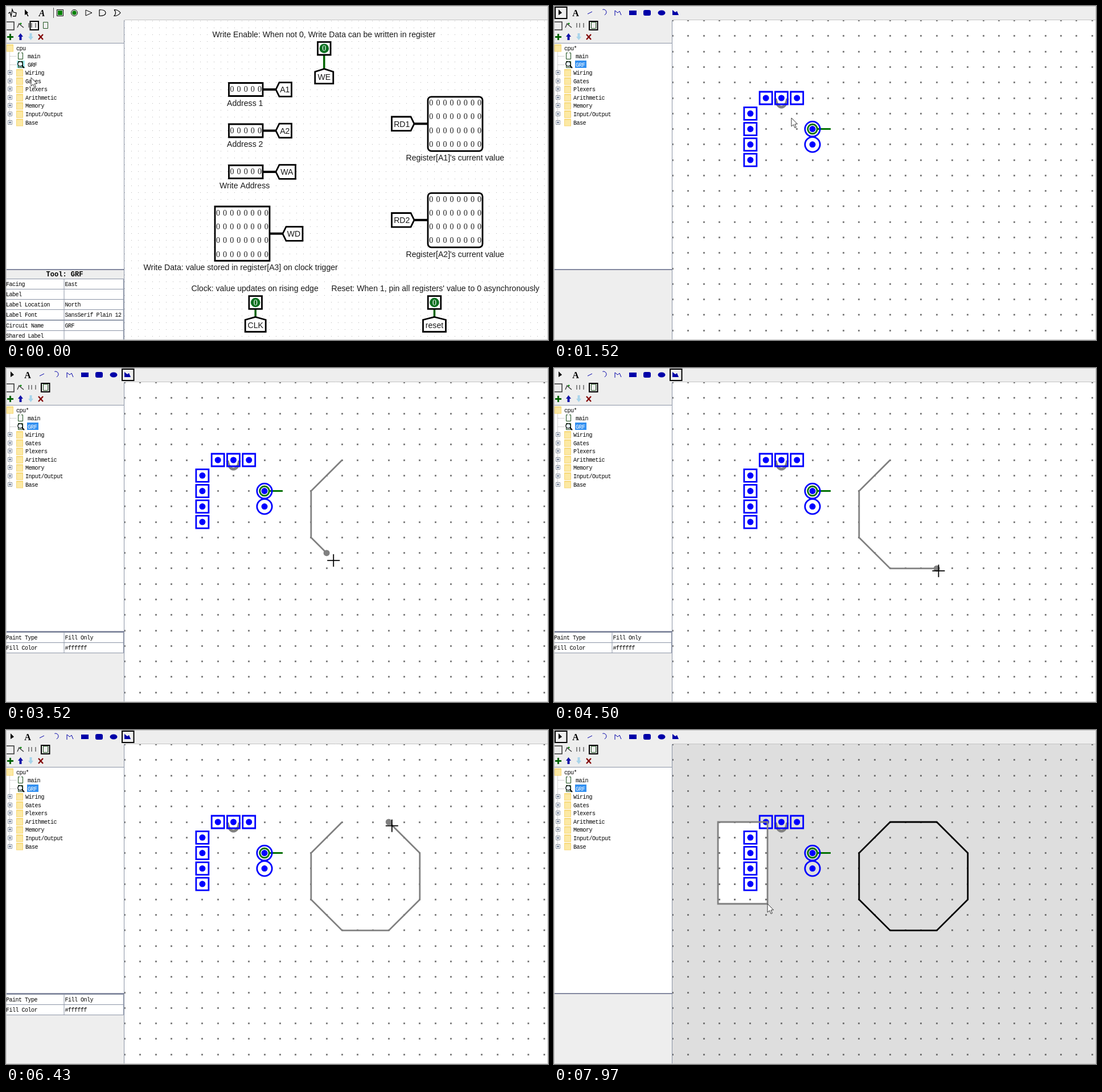
An HTML page with a canvas that plays this animation: 952 px wide and 588 px high, repeating every 8000 ms.

```html
<!DOCTYPE html>
<html lang="en">
<head>
<meta charset="utf-8">
<title>Circuit appearance editor</title>
<style>
html, body { margin: 0; width: 100%; height: 100%; overflow: hidden; background: #eee; }
canvas { display: block; }
</style>
</head>
<body>
<canvas width="952" height="588"></canvas>
<script>
const c = document.querySelector('canvas').getContext('2d');
const LOOP = 8000;
const SANS = '14.1px "Liberation Sans", sans-serif';
const BITS = '14.1px "Liberation Serif", serif';
const MONO = '10px "Liberation Mono", monospace';
const ICON = '16px "Liberation Serif", serif';
const BLUE = '#0000ff', NAVY = '#0000a8', GREEN = '#006400', GREY = '#808080', LINE = '#8b94a6';

// Moments at which the state changes
const T = { press: 100, menu: 300, scene: 810, select: 1300, remove: 1430, tool: 1980, start: 2330, close: 7600, drag: 7780 };

// Appearance editor grid
const STEP = 27.28;
const gx = col => 208.5 + STEP * col;
const gy = row => 25.6 + STEP * row;

// Octagon corners, walked from the top left one
const corners = [[14, 5]];
for (let i = 0; i < 8; i++) {
  const [x, y] = corners[i], a = (3 - i) * Math.PI / 4, n = 2 + i % 2;
  corners.push([x + n * Math.round(Math.cos(a)), y + n * Math.round(Math.sin(a))]);
}
// Start and end of the pointer's way to each corner
const legs = [
  [2050, 2310], [2350, 2560], [2700, 3230], [3290, 3660], [3740, 4490],
  [4750, 5130], [5290, 6040], [6110, 6420], [6730, 7510]
];
// Pointer: start, end, x, y; it drifts away from the snapped corner
const moves = [
  [30, 160, 44, 100], [300, 470, 100, 136], [810, 1040, 330, 200],
  [1200, 1290, 417, 197], [1570, 2000, 216, 14],
  ...legs.map(([from, to], i) => [from, to, gx(corners[i][0]) + 0.8 * i, gy(corners[i][1]) + 1 + 0.8 * i]),
  [7600, 7730, 288, 162], [7780, 7970, 375, 306]
];

function pointerAt(t) {
  let x = 44, y = 126;
  for (const [from, to, x1, y1] of moves) {
    const u = Math.min(1, Math.max(0, (t - from) / (to - from))), e = u * u * (3 - 2 * u);
    x += (x1 - x) * e;
    y += (y1 - y) * e;
  }
  return [x, y];
}

// ---- drawing helpers ----
function text(s, x, y, font = MONO, color = '#000', align = 'left') {
  c.font = font;
  c.letterSpacing = font === MONO ? '-0.5px' : '0px';
  c.textAlign = align;
  c.fillStyle = color;
  c.fillText(s, x, y);
}
function fill(color, x, y, w, h) {
  c.fillStyle = color;
  c.fillRect(x, y, w, h);
}
function paint(stroke, width, inside) {
  if (inside) { c.fillStyle = inside; c.fill(); }
  if (stroke) { c.strokeStyle = stroke; c.lineWidth = width; c.stroke(); }
}
function box(x, y, w, h, stroke = '#000', width = 2.8, inside, r = 0) {
  c.beginPath();
  c.roundRect(x, y, w, h, r);
  paint(stroke, width, inside);
}
function path(points, stroke, width, inside, closed = !!inside) {
  c.beginPath();
  points.forEach(p => c.lineTo(...p));
  if (closed) c.closePath();
  paint(stroke, width, inside);
}
function line(x0, y0, x1, y1, color = LINE, width = 1) {
  path([[x0, y0], [x1, y1]], color, width);
}
function disc(x, y, r, stroke, width, inside) {
  c.beginPath();
  c.arc(x, y, r, 0, 7);
  paint(stroke, width, inside);
}
function dots(x0, y0, step, size, color) {
  for (let x = x0; x < 950; x += step)
    for (let y = y0; y < 586; y += step)
      fill(color, Math.round(x - size / 2), Math.round(y - size / 2), size, size);
}
function cross(x, y, r, color, width) {
  line(x - r, y, x + r, y, color, width);
  line(x, y - r, x, y + r, color, width);
}

// ---- toolbars ----
function arrowIcon(x) {
  path([[x, 6], [x, 16], [x + 6, 12]], null, 0, '#000');
}
// Outline icon with a flat left side and a bulging or pointed right side
function gate(x, bulge, dent) {
  c.beginPath();
  c.moveTo(x, 6.5);
  c.quadraticCurveTo(x + bulge, 6.5, x + 11, 12);
  c.quadraticCurveTo(x + bulge, 17.5, x, 17.5);
  c.quadraticCurveTo(x + dent, 12, x, 6.5);
  paint('#000', 1.2);
}
function layoutTools() {
  path([[4, 13], [7, 11], [9, 18], [11, 6], [13, 11], [18, 12], [17, 18], [12, 18]], '#000', 1.3);
  arrowIcon(33);
  line(36, 13, 39, 18, '#000', 1.5);
  text('A', 63, 18, 'italic bold ' + ICON, '#000', 'center');
  fill('#555', 83, 3, 1, 18);
  box(89.5, 6.5, 11, 11, '#000', 1);
  fill('#008000', 91, 8, 8, 8);
  disc(120, 12, 5.5, '#000', 1);
  disc(120, 12, 3.8, null, 0, '#008000');
  path([[140, 7], [151, 12], [140, 17]], '#000', 1, null, true);
  gate(164, 11, 0);
  gate(190, 7, 5);
}
function drawTools(polygonTool) {
  arrowIcon(8);
  text('A', 38, 18, 'bold ' + ICON, '#000', 'center');
  line(59, 14, 67, 10, NAVY);
  c.beginPath(); c.arc(87, 11, 5, -1.9, 1.2); paint(NAVY, 1);
  path([[107, 17], [107, 8], [112, 12], [115, 9], [118, 16]], NAVY, 1);
  box(132, 8, 13, 8, null, 0, NAVY);
  box(157, 7, 13, 10, null, 0, NAVY, 3);
  box(182.5, 7.5, 13, 9, null, 0, NAVY, [6.5, 4.5].map(r => ({ x: 6.5, y: 4.5 })));
  path([[208, 7], [213, 11], [216, 9], [219, 16], [208, 16]], null, 0, NAVY);
  box(polygonTool ? 204 : 2, 2, 20.5, 20, '#000', 2);
}
function arrowUpDown(x, up, color) {
  const y = d => 54 - up * d;
  path([[x, y(6)], [x + 4.5, y(0)], [x + 2, y(0)], [x + 2, y(-6)], [x - 2, y(-6)], [x - 2, y(0)], [x - 4.5, y(0)]],
    null, 0, color);
}
function sideTools(editing) {
  box(-2, 28, 16, 14, '#333', 1.5);
  path([[20, 38], [23, 31], [26, 34], [31, 38]], '#333', 1.3);
  disc(26, 31, 1.5, null, 0, '#008000');
  [40, 45, 52].forEach(x => line(x, 30, x, 38, '#444', 1.2));
  box(65.5, 28.5, 8, 11, '#252', 1);
  box(editing ? 62 : 42.5, 27, 14.5, 15, '#000', 2);
  cross(7.5, 54.5, 5.5, GREEN, 3);
  arrowUpDown(25.5, 1, '#1010a8');
  arrowUpDown(43.5, -1, '#a8d4ea');
  line(57, 50, 65, 59, '#800000', 2.2);
  line(65, 50, 57, 59, '#800000', 2.2);
}

// ---- side panel ----
function folder(x, y) {
  fill('#f7d774', x, y - 6, 12, 13);
  fill('#fce9a4', x + 1, y - 4, 10, 10);
}
function tree(t) {
  const rowY = i => 73.5 + 14.56 * i;
  box(0.5, 65.5, 207, 398.5, LINE, 1, '#fff');
  c.setLineDash([1, 1]);
  line(6.5, 80, 6.5, 204, '#aaa');
  [1, 2].forEach(i => line(7, Math.round(rowY(i)) + 0.5, 19, Math.round(rowY(i)) + 0.5, '#aaa'));
  c.setLineDash([]);
  folder(1, 73.5);
  text(t < T.remove ? 'cpu' : 'cpu*', 18, 77.5);
  const picked = t >= T.press;
  if (picked) fill('#3390f0', 37, 96, 20, 13);
  else fill('#a8eef4', 19, 96, 14, 13);
  ['main', 'GRF'].forEach((s, i) => {
    const y = rowY(i + 1);
    box(21.5, Math.round(y) - 5.5, 8, 11, '#164a16', 1);
    fill('#fff', 24, y - 6, 3, 1);
    text(s, 38, y + 4, MONO, i && picked ? '#fff' : '#000');
  });
  disc(25, 102, 4.2, '#000', 1.3, '#e8f6f8');
  line(28, 105, 32, 109, '#000', 2.2);
  ['Wiring', 'Gates', 'Plexers', 'Arithmetic', 'Memory', 'Input/Output', 'Base'].forEach((s, i) => {
    const y = rowY(i + 3), mid = Math.round(y);
    box(3.5, mid - 3.5, 7, 7, '#8a93a0', 1, '#fff');
    cross(7, mid, 2, '#30466a', 1);
    folder(18, y);
    text(s, 34, y + 4);
  });
}
function table(title, rows) {
  const h = 18.15, y = title ? 480.5 : 465.5, end = y + h * rows.length;
  text(title, 103, 476, 'bold 12px "Liberation Mono", monospace', '#000', 'center');
  rows.forEach((cells, i) => {
    const top = y + h * i;
    box(-1, Math.floor(top) + 0.5, 207.5, h, LINE, 1, '#fff');
    cells.forEach((s, j) => text(s, 103.5 * j, top + 12.5));
  });
  line(102, y, 102, end);
}
function attributes(t) {
  fill('#eee', 0, 465, 207, 123);
  line(0, 464, 208, 464, '#6f7590', 1.5);
  if (t < T.press) table('Tool: GRF', [
    ['Facing', 'East'], ['Label', ''], ['Label Location', 'North'],
    ['Label Font', 'SansSerif Plain 12'], ['Circuit Name', 'GRF'], ['Shared Label', '']
  ]);
  else if (t >= T.select && t < T.remove) table('Selection: Rectangle', [
    ['Paint Type', 'Border Only'], ['Stroke Width', '2'], ['Stroke Color', '#000000']
  ]);
  else if (t >= T.tool && t < T.close) table('', [['Paint Type', 'Fill Only'], ['Fill Color', '#ffffff']]);
}
function popup(x, y, py) {
  box(x + 0.5, y + 0.5, 159, 131, '#999', 1, '#f4f4f4');
  ['Edit Circuit Layout', 'Edit Circuit Appearance', 'Analyze Circuit', 'Get Circuit Statistics',
    'Set As Main Circuit', 'Remove Circuit'].forEach((s, i) => {
    const top = y + 3 + 20.2 * i + (i > 3 ? 5 : 0);
    if (py >= top && py < top + 20) fill('#b8cfe5', x + 2, top, 156, 20);
    text(s, x + 22, top + 13.5);
  });
  line(x + 2, y + 86.5, x + 157, y + 86.5, '#aaa');
}

// ---- circuit layout ----
function label(s, x, y, align) {
  text(s, x, y, SANS, '#1a1a1a', align);
}
function bits(x, y, cols, rows) {
  for (let i = 0; i < cols * rows; i++)
    text('0', x + 12.1 * (i % cols), y + 24.3 * Math.floor(i / cols) + 4.7, BITS, '#222', 'center');
}
function sideTunnel(tip, y, end, name) {
  const s = Math.sign(end - tip), neck = tip + 6 * s;
  path([[tip, y], [neck, y - 12.3], [end, y - 12.3], [end, y + 12.3], [neck, y + 12.3]], '#000', 2.8, '#fff');
  label(name, (tip + 4 * s + end) / 2, y + 5.4, 'center');
}
function bitPin(x, y, gap, half, name) {
  const top = y + gap;
  line(x, y + 12, x, top, GREEN, 3.5);
  box(x - 11.3, y - 11.3, 22.6, 22.6, '#000', 2.8, '#fff');
  disc(x, y, 8.3, null, 0, '#0a7020');
  text('0', x, y + 4.7, BITS, '#fff', 'center');
  path([[x, top], [x + half, top + 5], [x + half, top + 26], [x - half, top + 26], [x - half, top + 5]],
    '#000', 2.8, '#fff');
  label(name, x, top + 19.5, 'center');
}
function layout() {
  dots(208.7, 26.2, 12.08, 1, '#b4b4b4');
  [['A1', 'Address 1', 388], ['A2', 'Address 2', 388], ['WA', 'Write Address', 375]].forEach(([name, s, x], i) => {
    const y = 147 + 72.5 * i;
    line(451, y, 474, y, '#000', 4);
    box(391.5, y - 11.5, 59.5, 23, '#000', 2.8, '#fff');
    bits(397, y - 0.5, 5, 1);
    sideTunnel(474, y, name === 'WA' ? 508.5 : 501.5, name);
    label(s, x, y + 28.5);
  });
  line(463, 400.7, 486, 400.7, '#000', 4);
  box(367, 353, 96, 95.5, '#000', 2.8, '#fff');
  bits(372.5, 364, 8, 4);
  sideTunnel(486, 401, 521, 'WD');
  [1, 2].forEach(i => {
    const y = 207.3 + 169.5 * (i - 1);
    line(717, y, 741, y, '#000', 4);
    box(741, y - 47.5, 96, 95.5, '#000', 2.8, '#fff', 6);
    bits(746.8, y - 37, 8, 4);
    sideTunnel(717, y, 677.5, 'RD' + i);
    label(`Register[A${i}]'s current value`, 702.5, y + 64.7);
  });
  bitPin(558.8, 74.7, 36, 16, 'WE');
  bitPin(438.2, 522, 25.5, 18, 'CLK');
  bitPin(752.5, 522, 25.5, 20, 'reset');
  label('Write Enable: When not 0, Write Data can be written in register', 362.5, 55);
  label('Write Data: value stored in register[A3] on clock trigger', 241.5, 465);
  label('Clock: value updates on rising edge', 325.5, 502);
  label("Reset: When 1, pin all registers' value to 0 asynchronously", 571.5, 502);
}

// ---- appearance editor ----
function inputPort(x, y) {
  box(x - 11, y - 11, 22, 22, BLUE);
  disc(x, y, 5.5, null, 0, BLUE);
}
function outputPort(x, y) {
  disc(x, y, 13.2, BLUE, 2.8);
  disc(x, y, 5.5, null, 0, BLUE);
}
function body(selected) {
  box(gx(5), gy(5), STEP * 4, STEP * 5, '#000', 4);
  if (selected) for (const i of [5, 9]) for (const j of [5, 10])
    box(gx(i) - 4, gy(j) - 4, 8, 8, '#000', 1, '#fff');
}
function octagon(t, px, py) {
  const points = corners.slice(0, 8).map(([i, j]) => [gx(i), gy(j)]);
  if (t >= T.close) return path(points, '#000', 2.8, null, true);
  const leg = legs.filter(([from]) => from <= t).length - 1;
  const drift = 0.8 * leg;
  const tip = [
    gx(Math.round((px - drift - gx(0)) / STEP)),
    gy(Math.round((py - drift - 1 - gy(0)) / STEP))
  ];
  path([...points.slice(0, Math.max(1, leg)), tip], GREY, 2.8);
  disc(...tip, 5.5, null, 0, GREY);
}
function appearance(t, px, py) {
  const dragging = t >= T.drag;
  if (dragging) {
    fill('#dedede', 208, 25, 743, 562);
    fill('#fff', 288, 162, px - 288, py - 162);
  }
  dots(gx(0), gy(0), STEP, 3, dragging ? '#777' : '#858585');
  c.beginPath();
  c.moveTo(389, 163);
  c.bezierCurveTo(392, 183, 407, 183, 410, 163);
  paint(GREY, 5);
  if (t < T.remove) body(t >= T.select);
  [6, 7, 8].forEach(i => inputPort(gx(i), gy(5)));
  [6, 7, 8, 9].forEach(j => inputPort(gx(5), gy(j)));
  line(gx(9) + 8, 216.5, 486, 216.5, '#007000', 3);
  [7, 8].forEach(j => outputPort(gx(9), gy(j)));
  disc(gx(9), gy(7), 8.3, '#007000', 2.8);
  if (t >= T.start) octagon(t, px, py);
  if (dragging) box(288, 162, px - 288, py - 162, GREY);
}

function arrow(x, y) {
  const shape = [[0, 0], [0, 15], [3.6, 11.8], [6, 17.5], [8.4, 16.5], [6, 11], [10.5, 10.7]];
  path(shape.map(([dx, dy]) => [x + dx, y + dy]), '#333', 1, '#fff');
}

function draw(t) {
  const [px, py] = pointerAt(t);
  const editing = t >= T.scene, polygonTool = t >= T.tool && t < T.close;
  fill('#eee', 0, 0, 952, 588);
  fill('#fff', 208, 25, 743, 562);
  c.save();
  c.beginPath(); c.rect(208, 25, 743, 562); c.clip();
  if (editing) appearance(t, px, py); else layout();
  c.restore();
  line(207.5, 25, 207.5, 587);
  line(208, 24.5, 951, 24.5, '#c4c4c4');
  if (editing) drawTools(polygonTool); else layoutTools();
  sideTools(editing);
  tree(t);
  attributes(t);
  box(0.5, 0.5, 951, 587, '#c8c8c8', 1);
  if (t >= T.menu && !editing) popup(47, 103, py);
  if (polygonTool && px > 208 && py > 25) cross(px, py, 11, '#000', 1.8);
  else arrow(px, py);
}

function frame(now) {
  draw(now % LOOP);
  requestAnimationFrame(frame);
}
requestAnimationFrame(frame);
</script>
</body>
</html>
```
